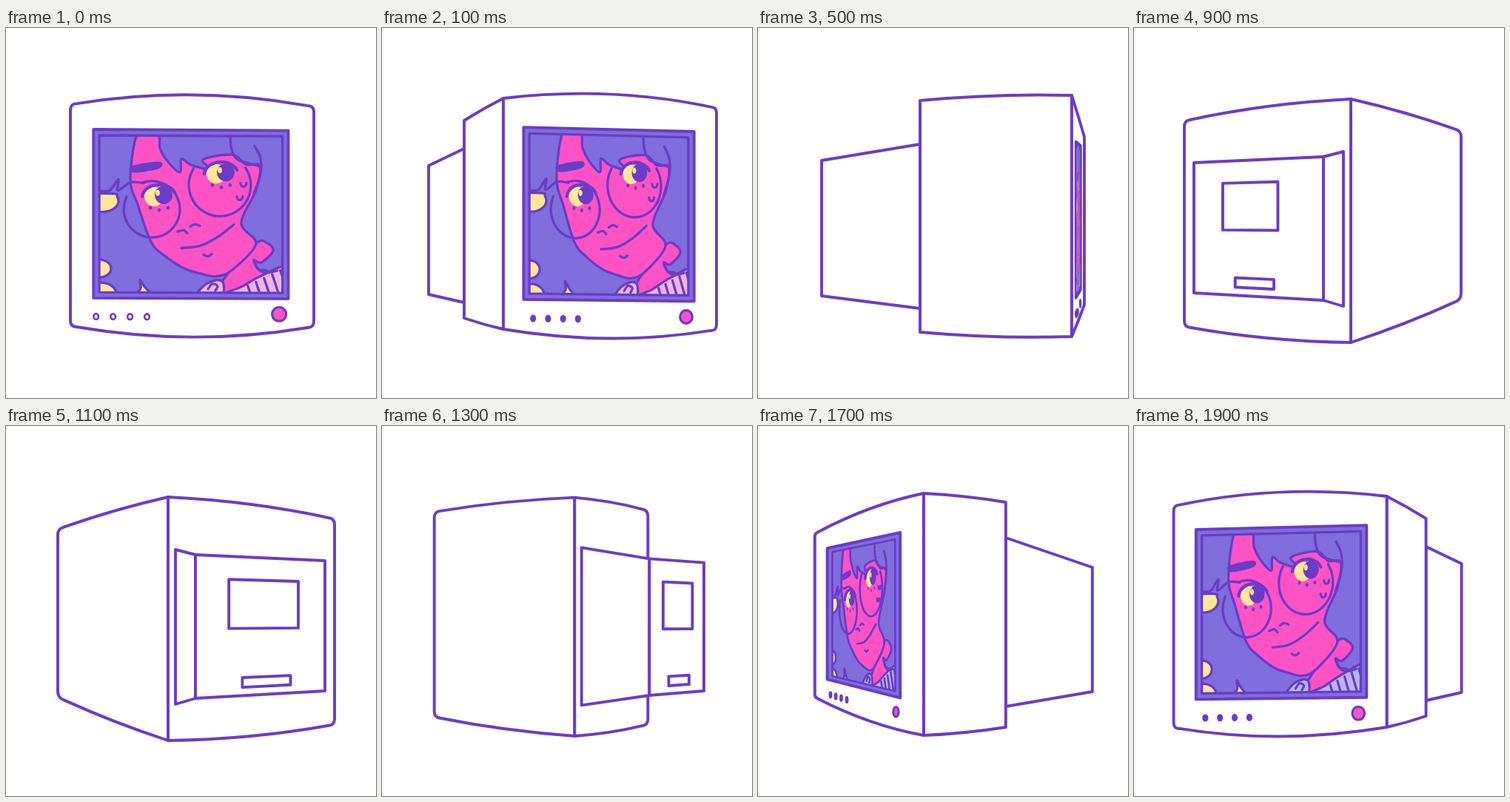
Animation of 500x500 px, one loop 2000 ms. Source, as an HTML page with a canvas:

```html
<!DOCTYPE html>
<html lang="en">
<head>
<meta charset="utf-8">
<title>Turning monitor</title>
<style>
html, body { margin: 0; width: 100%; height: 100%; overflow: hidden; background: #fff; }
canvas { display: block; width: 100vmin; height: 100vmin; }
</style>
</head>
<body>
<canvas id="stage" width="500" height="500"></canvas>
<script>
const ctx = document.getElementById('stage').getContext('2d');
const INK = '#6a3cc8', HAIR = '#7f6edb', PINK = '#ff53c5', YELLOW = '#ffe796';
const STEP = 100, STEPS = 20, LINE = 3.9;

const mix = (a, b, t) => Array.isArray(a) ? a.map((v, i) => mix(v, b[i], t)) : a + (b - a) * t;

// The monitor is a row of upright edges, each [x, top, bottom].
// Front: tube end, tube root, side, near, far.
const flatEdge = [87, 102, 404];
const FRONT = [
  [0, [flatEdge, flatEdge, flatEdge, flatEdge, [416, 105, 405]]],
  [1, [[63, 186, 360], [111, 163, 371], [111, 125, 392], [164, 95, 407], [452, 107, 409]]],
  [3, [[65, 191, 359], [182, 151, 379], [182, 103, 407], [293, 91, 418], [440, 145, 367]]],
  [5, [[86, 179, 362], [219, 157, 379], [219, 98, 411], [424, 91, 417], [441, 147, 374]]]
];
// Back: case far, case near, side far, panel far, panel near, panel root.
const BACK = [
  [6, [[195, 108, 404], [231, 97, 416], [441, 104, 407], [75, 186, 358], [98, 182, 362], [222, 163, 378]]],
  [9, [[68, 125, 404], [293, 96, 425], [442, 139, 367], [81, 182, 358], [256, 174, 368], [283, 167, 376]]],
  [10, [[91, 103, 406], [421, 103, 406], [421, 103, 406], [140, 174, 366], [372, 174, 366], [372, 174, 366]]]
];

function edgesAt(keys, step, flip) {
  const i = Math.max(1, keys.findIndex(([at]) => at >= step));
  const [[from, a], [to, b]] = [keys[i - 1], keys[i]];
  const sum = step < 6 ? 500 + 5.6 * step : 512;
  return mix(a, b, (step - from) / (to - from))
    .map(([x, top, bottom]) => [flip ? sum - x : x, top, bottom]);
}

function paint(fill, width) {
  if (fill) { ctx.fillStyle = fill; ctx.fill(); }
  if (width) { ctx.strokeStyle = INK; ctx.lineWidth = width; ctx.stroke(); }
}

function poly(pts, fill, width = LINE) {
  ctx.beginPath();
  pts.forEach(p => ctx.lineTo(...p));
  ctx.closePath();
  paint(fill, width);
}

const corners = ([a, at, ab], [b, bt, bb]) => [[a, at], [b, bt], [b, bb], [a, ab]];

// A face between two edges with bulging top and bottom and rounded corners.
function slab(a, b, bulge = 0, ra = 0, rb = 0) {
  const wide = Math.abs(b[0] - a[0]);
  if (wide < 1) return;
  const lift = 2 * bulge * wide;
  const on = (k, row) => [mix(a[0], b[0], k), mix(a[row], b[row], k)];
  const [ka, kb] = [ra / wide, 1 - rb / wide];
  const [tx, ty] = on(0.5, 1), [bx, by] = on(0.5, 2);
  ctx.beginPath();
  ctx.moveTo(a[0], a[1] + ra);
  ctx.quadraticCurveTo(a[0], a[1], ...on(ka, 1));
  ctx.quadraticCurveTo(tx, ty - lift, ...on(kb, 1));
  ctx.quadraticCurveTo(b[0], b[1], b[0], b[1] + rb);
  ctx.lineTo(b[0], b[2] - rb);
  ctx.quadraticCurveTo(b[0], b[2], ...on(kb, 2));
  ctx.quadraticCurveTo(bx, by + lift, ...on(ka, 2));
  ctx.quadraticCurveTo(a[0], a[2], a[0], a[2] - ra);
  ctx.closePath();
  paint('#fff', LINE);
}

// Perspective map from the unit square to the face between two edges.
function projector(left, right) {
  const hl = left[2] - left[1], hr = right[2] - right[1];
  return (u, v) => {
    const [x, top, bottom] = mix(left, right, u * hl / (hr + (hl - hr) * u));
    return [x, mix(top, bottom, v)];
  };
}

function spline(pts, closed) {
  const n = pts.length;
  const at = i => closed ? pts[(i + n) % n] : pts[Math.max(0, Math.min(n - 1, i))];
  ctx.beginPath();
  ctx.moveTo(...pts[0]);
  for (let i = 0; i < (closed ? n : n - 1); i++) {
    const [a, b, c, d] = [at(i - 1), at(i), at(i + 1), at(i + 2)];
    ctx.bezierCurveTo(b[0] + (c[0] - a[0]) / 6, b[1] + (c[1] - a[1]) / 6,
                      c[0] - (d[0] - b[0]) / 6, c[1] - (d[1] - b[1]) / 6, ...c);
  }
}

const pairs = s => s.trim().split(/\s+/).map(p => p.split(',').map(Number));

function arc(x, y, rx, ry, from = 0, to = 2 * Math.PI) {
  return Array.from({ length: 17 }, (_, i) => {
    const a = mix(from, to, i / 16);
    return [x + rx * Math.cos(a), y + ry * Math.sin(a)];
  });
}

const SKIN = `178,144 168,206 178,240 196,290 215,309 240,325 262,332 284,336 306,327
  338,292 318,264 338,220 343,187 324,185 306,172 266,179 279,193 250,186 237,178 235,196
  218,181 208,164 205,144`;
const NECK = '297,336 338,291 355,292 361,302 345,317 335,314 341,326 352,331 310,362 284,362';
const COLLAR = ['258,364 268,348 285,341 294,346 290,364', '290,364 318,350 345,335 380,323 380,364'];
const STRANDS = [
  '126,222 140,221 152,206 151,221 168,210 186,211',
  '303,147 305,165 314,179 343,187',
  '336,160 344,176 344,198 335,225',
  '335,314 341,326 352,331 367,328',
  '273,353 279,346 286,349 283,355'
];
const FEATURES = ['232,276 240,274 245,278', '249,269 255,266 262,268',
  '237,298 262,295 286,283 308,266', '267,307 273,309 278,306'];

function drawPortrait(left, right, collar, width) {
  const project = projector(left, right);
  const shape = (pts, fill, line = width, closed = true) => {
    spline(pts.map(([x, y]) => project((x - 126) / 248, (y - 147) / 211)), closed);
    paint(fill, line);
  };
  const line = (pts, weight = width) => shape(pts, null, weight, false);
  const spot = (x, y, rx, ry, fill) => shape(arc(x, y, rx, ry), fill, 0);

  const eye = (x, y) => {
    spot(x, y, 13, 13, YELLOW);
    spot(x + 13, y - 2, 12, 12, INK);
    spot(x + 5, y - 5, 3, 4, YELLOW);
    line(arc(x + 7, y + 1, 23, 17, 3.2, 5.9), width * 1.3);
    for (let i = -1; i <= 1; i++) {
      spot(x + 7 + 12 * i, y + 18 - 3 * Math.abs(i), 2.3, 2.5, INK);
    }
  };

  ctx.save();
  poly(corners(left, right), HAIR, 0);
  ctx.clip();
  shape(arc(129, 235, 23, 15, -0.7, 3.8), YELLOW);
  shape(arc(126, 326, 16, 12), YELLOW);
  shape(arc(128, 360, 21, 15), YELLOW);
  shape(pairs('176,362 182,352 181,341 187,350 196,362'), YELLOW);
  shape(pairs(NECK), PINK);
  COLLAR.forEach(s => shape(pairs(s), collar));
  for (let x = 327; x < 375; x += 11) {
    line([[x, 353 - (x - 318) * 0.48], [x + 9, 380 - (x - 318) * 0.48]]);
  }
  shape(pairs(SKIN), PINK);
  shape(pairs('170,188 207,182 207,191 172,197'), INK, 0);
  eye(200, 229);
  eye(284, 198);
  line(arc(197, 246, 38, 38, -1.9, 3.6));
  line(arc(289, 213, 42, 42, -0.6, 3.7));
  line(arc(321, 210, 4, 5, 0, 3.1));
  line(arc(316, 228, 4, 5, 0, 3.1));
  [...STRANDS, ...FEATURES].forEach(s => line(pairs(s)));
  ctx.restore();
}

function drawButtons(at, scale, step) {
  const button = (u, v, rx, ry, fill, width) => {
    ctx.beginPath();
    ctx.ellipse(...at(u, v), rx, ry, 0, 0, 7);
    paint(fill, width);
  };
  const first = 0.013 + 0.042 * Math.min(1, step);
  for (let i = 0; i < 4; i++) {
    button(first + 0.087 * i, 1.11, 0.8 + 2.6 * scale ** 2, 3.8, step ? INK : '#fff', 2.6);
  }
  button(0.953, 1.092, 9.5 * scale, 5 + 4.5 * scale, PINK, 3.2);
}

function drawFront(step, flip) {
  const [tubeEnd, tubeRoot, side, near, far] = edgesAt(FRONT, step, flip);
  const round = 9 * Math.abs(far[0] - near[0]) / 329;
  slab(tubeEnd, tubeRoot);
  slab(side, near, 0.015);
  slab(near, far, 0.04, step ? 0 : 9, round);

  // The bezel hides more of the screen's near end as it turns away.
  const onFront = (u, top) => {
    const [x, a, b] = mix(near, far, u);
    return [x, mix(a, b, top), mix(a, b, 0.87)];
  };
  const frame = [
    onFront(0.095 + 0.06 * Math.max(0, step - 1), 0.115 + 0.007 * step),
    onFront(0.895 - 0.2 * (step / 5) ** 6, 0.113)
  ].sort((a, b) => a[0] - b[0]);
  const wide = frame[1][0] - frame[0][0], scale = wide / 264;
  const width = 3.3 * Math.min(1, 2.2 * scale);
  const inset = Math.min(7.8, 0.07 * wide) / wide;
  const inner = [inset, 1 - inset].map(k => {
    const [x, top, bottom] = mix(...frame, k);
    return [x, mix(top, bottom, 0.035), mix(top, bottom, 0.966)];
  });

  poly(corners(...frame), HAIR);
  drawPortrait(...inner, flip ? '#b9b5f1' : '#eeb5e8', width);
  poly(corners(...inner), null, width);
  drawButtons(projector(...frame), scale, step);
}

function drawBack(step, flip) {
  const [far, near, side, panelFar, panelNear, root] = edgesAt(BACK, step, flip);
  slab(near, side, 0.015, 0, 8);
  slab(far, near, 0.02, 8);
  slab(panelNear, root);
  slab(panelFar, panelNear);

  const at = projector(...[panelFar, panelNear].sort((a, b) => a[0] - b[0]));
  const box = (u, v, w, h) =>
    poly([at(u, v), at(u + w, v), at(u + w, v + h), at(u, v + h)]);
  const stretch = flip ? 1.25 : 1;
  box(0.24, 0.165, 0.43 * stretch, 0.35);
  box(0.34, 0.87, 0.3 * stretch, 0.07);
}

function draw(now) {
  const k = Math.floor(now / STEP) % STEPS;
  const flip = k > STEPS / 2;
  const step = flip ? STEPS - k : k;
  ctx.fillStyle = '#fff';
  ctx.fillRect(0, 0, 500, 500);
  ctx.lineJoin = ctx.lineCap = 'round';
  (step < 6 ? drawFront : drawBack)(step, flip);
}

const start = performance.now();
function tick() {
  draw(performance.now() - start);
  requestAnimationFrame(tick);
}
tick();
</script>
</body>
</html>
```
